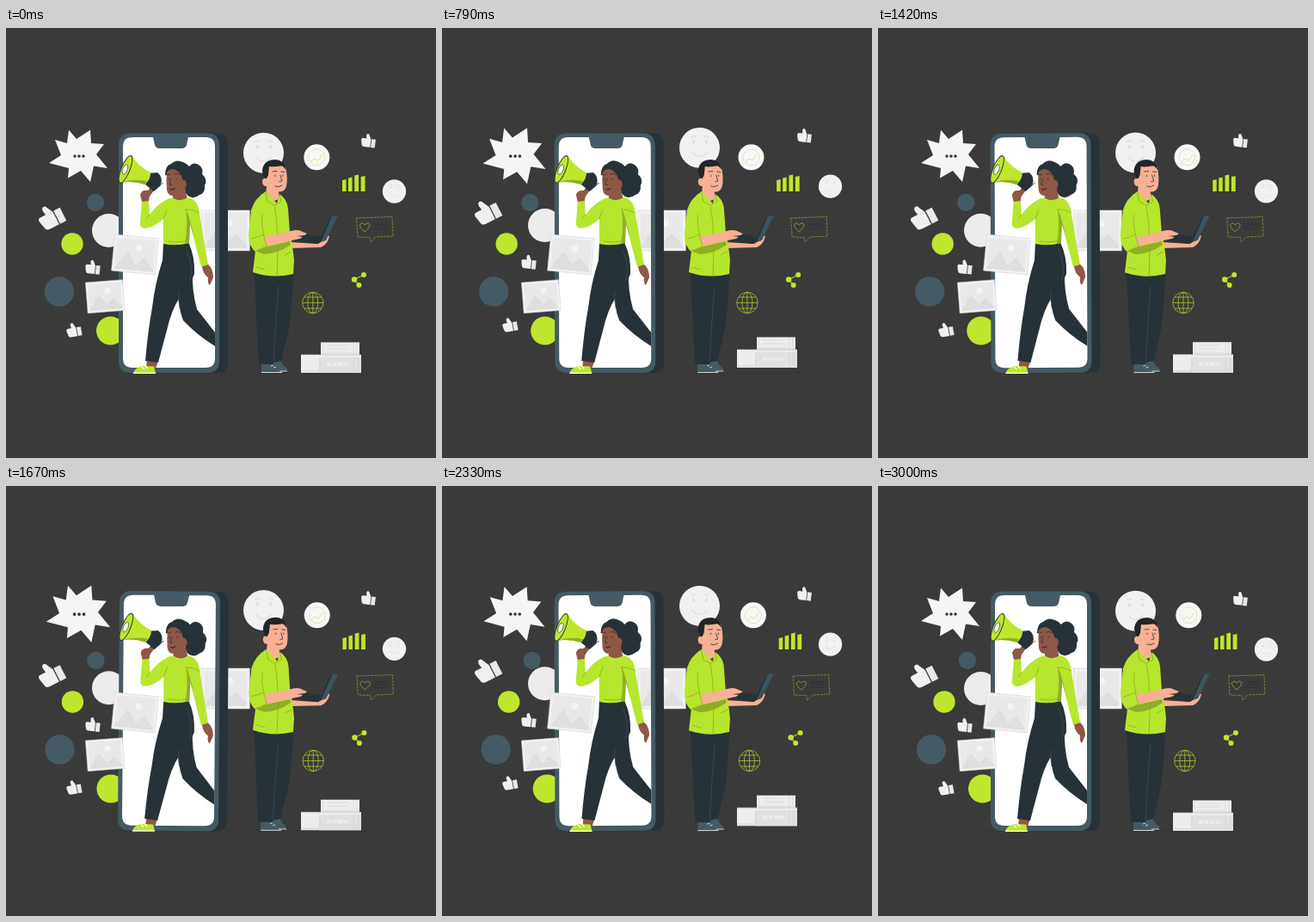
An HTML page for the animation above (3.04 s loop, 500 by 500 pixels).

```html
<!DOCTYPE html>
<html lang="en">
<head>
<meta charset="utf-8">
<title>Social campaign</title>
<style>
html, body { margin: 0; width: 100%; height: 100%; overflow: hidden; background: #3a3a3a }
svg { display: block; width: 100vw; height: 100vh }
.wind, .beat { transform-box: fill-box; transform-origin: center }
.green { fill: #bfe62c } .cloth { fill: #b7e62e } .shade { fill: #8fae26 }
.slate { fill: #455a64 } .dark { fill: #263238 }
.pale { fill: #f5f5f5 } .grey { fill: #e0e0e0 }
.brown { fill: #8f5746 } .skin { fill: #f9b094 }
.line { fill: none; stroke: #bfe62c; stroke-width: .8; stroke-opacity: .8 }
.thin { fill: none; stroke: #263238; stroke-width: .8; stroke-linecap: round }
.fold { fill: none; stroke: #86a51c; stroke-width: .7 }
.seam { fill: none; stroke: #435159; stroke-width: .7 }
.faint { fill: none; stroke: #dedede; stroke-linecap: round }
</style>
</head>
<body>
<svg viewBox="0 0 500 500">
<defs>
  <g id="thumb">
    <path fill="#f0f0f0" d="M5-3 0-13Q-5-15-5-9L-4-4H-12Q-15-3-14 1L-12 10Q-11 13-7 13H5Z"/>
    <path fill="#e8e8e8" d="M6.300-4H14.500V13H6.300Z"/>
  </g>
  <g id="photo">
    <path fill="#f2f2f2" stroke="#d2d2d2" stroke-width=".6" d="M-26-21.500H26V21.500H-26Z"/>
    <path fill="#e9e9e9" d="M-23-18.500H23V18.500H-23Z"/>
    <path fill="#dedede" d="M-23 18.500-9-3 2 12 11 3 23 16V18.500Z"/>
    <circle class="pale" cx="4" cy="-8" r="4"/>
  </g>
  <g id="face">
    <circle r="23.500" fill="#f1f1f1"/>
    <path class="faint" stroke-width="1.200" d="M-9 5Q0 15 9 5M-10-12Q-7-15-4-13M5-13Q8-15 11-12"/>
    <ellipse class="grey" cx="-7" cy="-7" rx="1.600" ry="2.400"/>
    <ellipse class="grey" cx="8" cy="-7" rx="1.600" ry="2.400"/>
  </g>
</defs>

<path d="M93 401H440" stroke="#323232" stroke-width=".6"/>

<g class="float">
  <use href="#thumb" transform="translate(51.500 219) rotate(-27)"/>
  <use href="#thumb" transform="translate(100.800 278) rotate(6) scale(.6)"/>
  <use href="#thumb" transform="translate(78.700 351) rotate(-10) scale(.6)"/>
  <use href="#thumb" transform="translate(421.300 131) rotate(7) scale(.58)"/>
  <circle cx="119.500" cy="235.500" r="19.500" fill="#ececec"/>
  <use href="#face" transform="translate(299.500 145.200)"/>
  <use href="#face" transform="translate(451.500 190) scale(.58)"/>
  <path fill="#ededed" d="M366 365.500H411V381H366ZM343 380H413V401H343Z"/>
  <path class="grey" d="M366 377.500H411V381H366ZM364 383H413V401H364ZM343 398H367V400.500H343Z"/>
  <path fill="none" stroke="#cdcdcd" stroke-width=".6" d="M368 365.500V377M404 366V377M408 366V377M365 384V400M404 383V400M409 383V400M343 380H413M373 369H397M373 373H397"/>
  <path fill="none" stroke="#ececec" stroke-width="4" stroke-dasharray="5 1.500" d="M373 391H398"/>
</g>

<g class="shake">
  <circle class="slate" cx="104" cy="203" r="10.200"/>
  <circle class="green" cx="77" cy="251" r="12.700"/>
  <circle class="slate" cx="62" cy="306.500" r="17.200"/>
  <circle class="green" cx="121.500" cy="352" r="16.500"/>
  <circle cx="361.300" cy="150.300" r="15" fill="#f8f8f8"/>
  <circle cx="361.300" cy="150.300" r="9.500" fill="none" stroke="#dde4c4" stroke-width="1"/>
  <path class="line" stroke-opacity=".6" d="M355 156 358 152 363 154 368 147"/>
  <path class="green" d="M391 177 395.500 176V190H391ZM398 174.500 402.500 173.500V190H398ZM405.300 171.500 410 170.500V190H405.300ZM412.700 173 417.500 172V190H412.700Z"/>
  <g stroke-opacity=".6">
    <path class="line" stroke-dasharray="3 1" style="stroke-opacity:.55" d="M407.500 221 449 219.500 450 242 430 243 424 249 423 243.500 409 243Z"/>
    <path class="line" style="stroke-opacity:.65" d="M417 237Q411 232 411.500 229Q414 225 417 229Q421 225 423 229Q423 232 417 237Z"/>
  </g>
  <path fill="none" stroke="#2f2f2f" stroke-width="1" d="M427 228H445M428 231H446M427 234H444"/>
  <path class="line" style="stroke-width:1.300" d="M416 287 405 292.500 410.500 299"/>
  <g class="green"><circle cx="405" cy="292.500" r="3.200"/><circle cx="416" cy="287" r="3"/><circle cx="410.500" cy="299" r="3"/></g>
  <g class="line"><circle cx="356.800" cy="319.500" r="12.200"/><ellipse cx="356.800" cy="319.500" rx="6" ry="12.200"/><path d="M356.800 307.500V331.500M344.800 319.500H369M347 313H367M347 326H367"/></g>
</g>

<g class="beat">
  <path class="pale" d="M73 118.500 82 129 98 118.500 99 134 114 135 105 147 118 163 102 160.500 98 179 87 166 72 174.500 73 163 50 157 64 148 57 130 71 134Z"/>
  <g class="dark"><circle cx="80" cy="149" r="1.700"/><circle cx="85" cy="149" r="1.700"/><circle cx="90" cy="149" r="1.700"/></g>
</g>

<rect class="wind" x="134" y="125" width="111" height="272" rx="11" fill="#fff"/>
<use href="#photo" transform="translate(255.500 235.500) scale(1.070 1.090)"/>
<g class="wind" fill-rule="evenodd">
  <path class="dark" d="M236 122.500H246Q258 122.500 258 136V388Q258 401 246 401H236Q246 397 246 386V138Q246 126 236 122.500Z"/>
  <path class="slate" d="M145 122.500H234Q248 122.500 248 136.500V387Q248 401 234 401H145Q131 401 131 387V136.500Q131 122.500 145 122.500ZM147 127Q136 127 136 138V384Q136 395 147 395H232Q243 395 243 384V138Q243 127 232 127H212L210 136Q209 140 204 140H179Q174 140 173 136L171 127Z"/>
</g>

<g class="wind">
  <path class="dark" d="M217 282Q216 306 222 327L243 354V370Q222 357 206 340Q200 325 200 302Z"/>
  <path class="brown" d="M164 386 177 387 174 396 163 395Z"/>
  <path class="dark" d="M183 250Q198 254 212 249Q220 266 219 286Q214 299 207 306Q196 320 190 340L177 389 162 387Q165 352 170 325Q173 298 182 270Z"/>
  <path class="seam" d="M210 258Q218 276 214 294M201 306Q200 316 202 326"/>
  <path class="green" d="M149 399Q151 395 159 393L172 393.500 174 401H148Z"/>
  <path fill="none" stroke="#fff" stroke-width="1.300" d="M148 401.300H174M158 394 161 397M162 393 165 396"/>

  <path class="dark" d="M185 171Q185 160 192 158Q198 152 206 156Q211 158 213 161Q218 155 224 159Q230 163 228 170Q235 176 231 183Q232 192 225 194Q219 199 213 196Q208 193 208 187L190 172Z"/>
  <path class="brown" d="M187 168Q186 177 187 188Q188 195 194 195L194 201Q203 205 211 199L208 187Q212 181 208 177Q205 178 204 172Q201 166 195 164Q189 164 187 168Z"/>
  <path class="thin" d="M188 171 191 170M196 170Q199 168 202 170.500M189 175V176.500M198 175V176.500M192 175 190 182 192.500 182.500"/>
  <path fill="none" stroke="#572c28" stroke-width="1.500" stroke-linecap="round" d="M191 187.500Q194 188.500 196 186.500"/>

  <path class="cloth" d="M166 200 167 217Q176 205 186 200Q190 197 195 198Q203 203 211 197Q221 198 224 210L229 240 235 275 227 278 219 247 214 226 213 250Q198 254 183 251L183 222Q172 232 162 233Q155 233 156 226L158 201Z"/>
  <path class="shade" d="M209 210Q213 217 219 245L214 228 213 250 208 250.500Q212 232 209 210Z"/>
  <path class="fold" d="M183 222 187 211M188 248Q198 250 208 248M167 217 163 222M208 211Q216 210 225 215"/>
  <path class="brown" d="M228 277.500 235 275Q241 280 241 290L237 299Q234 297 235 290Q229 286 228 277.500Z"/>

  <path class="dark" d="M166 169 176 168Q183 173 180 183L172 190 162 182Z"/>
  <path class="dark" d="M169 184 173 187 166 197 162 194Z"/>
  <path fill="none" stroke="#6b7b82" stroke-width="1" d="M179 183 183 180"/>
  <path class="green" d="M146 148Q154 161 168 168Q169 174 162 182Q147 177 133 180Z"/>
  <path class="shade" d="M134 180Q148 174.500 164 178L162 182Q147 177 133 180Z"/>
  <g transform="translate(139 164.300) rotate(22)">
    <ellipse class="dark" rx="5.500" ry="17.500"/>
    <ellipse class="green" rx="4.500" ry="16.300"/>
    <ellipse cx="-.5" cy=".5" rx="2.700" ry="6" fill="#f5f5f5" stroke="#263238" stroke-width=".6"/>
  </g>
  <path class="brown" d="M158 202 156 194Q158 188 164 189L169 187.500 171 190 167 195 166 201Z"/>
</g>

<use href="#photo" transform="translate(150 263.500) rotate(5.500) scale(.98)"/>
<use href="#photo" transform="translate(115.300 312.200) rotate(-4.500) scale(.83)"/>

<g class="wind">
  <path class="slate" d="M311 388 319 386Q322 393 327 396V399H312Z"/>
  <path class="dark" d="M289 285H334Q333 320 329 350L320 387 311 389 310 392 294 391Q291 340 289 285Z"/>
  <path class="seam" d="M317 300Q313 345 311 388"/>
  <path class="slate" d="M297 391 310 391Q314 396 321 398V401H297Z"/>
  <path fill="none" stroke="#e4e4e4" stroke-width=".9" d="M297 400.500H321M318 399H327M308 393 311 392M311 395 314 394"/>

  <path class="skin" d="M302 166Q303 159 309 159L325 161Q328 175 326 184Q324 191 317 190.500L318 198Q311 205 302 196L303 184Q298 184 298 178Q299 173 303 175Z"/>
  <path fill="#20262a" d="M301 175Q296 167 299.500 160Q303 153 313 153Q323 153 326 165L321 160Q312 162 306 161L305 171 303 175Z"/>
  <path class="thin" d="M310 167 315 166.500M320 167 324 167.500M313 171V172.500M322 171V172.500M319 171 321 178 318 178.500M313 184Q317 186 321 183"/>
  <path class="skin" d="M330 249 361 251Q367 246 372 240L376 242Q374 252 366 255L331 256Z"/>
  <path class="cloth" d="M302 190Q289 198 285 212L282 240Q282 255 290 259L287 284Q310 292 334 286L335 270Q333 250 330 238L328 210Q327 199 318 193L315 204Z"/>
  <path class="shade" d="M289 259 304 254 330 248 331 252Q315 263 300 263Z"/>
  <path class="fold" d="M302 191 304 202 312 206 320 202 318 194M312 206Q318 235 315 288M300 241Q296 228 298 217M291 278 301 281M324 264 332 260"/>
  <path class="dark" d="M334 247 350 240 372 244 363 251Z"/>
  <path fill="#3c5360" d="M363 250 376 221Q377 219.500 379 219L386 218 372 247Z"/>
  <path class="dark" d="M363 250 376 221Q377 219.500 379 219L366 249Z"/>
  <path class="skin" d="M299 243 328 237Q339 233 345 237L350 239 347 241 338 242 345 243 342 245 327 248 302 254Z"/>
  <path class="cloth" d="M284 239 299 239 303 254 290 260Q283 256 284 239Z"/>
  <path class="fold" d="M285 245Q292 244 299 240L303 254 290 259"/>
</g>
</svg>
<script>
const LOOP = 3040, FRAMES = 73, FPS = 24;
const sway = [[0, 0], [.25, 1], [.75, -1], [1, 0]];
const pulse = [[0, 1], [.1, 1.1], [.3, 1], [.4, 1], [.5, 1.1], [.6, 1], [1, 1]];
const jolt = [0, -1, 2, -4, 4, -4, 4, -4, 2, -1, 0].map((x, i) => [i / 10, x]);

// Linear interpolation between keyframes
function at(keys, p) {
  const i = Math.max(1, keys.findIndex(k => k[0] >= p));
  const [a, x] = keys[i - 1], [b, y] = keys[i];
  return x + (y - x) * (p - a) / (b - a);
}

const move = (name, value) =>
  document.querySelectorAll('.' + name).forEach(el => el.style.transform = value);

function draw(now) {
  const frame = Math.floor((now % LOOP + 6) * FPS / 1000) % FRAMES;
  const s = frame / FPS, half = s / 1.5 % 1;
  const lift = 3 * (1 - Math.cos(2 * Math.PI * half));
  move('float', `translateY(${-lift}px)`);
  move('shake', `translateX(${at(jolt, s / 3)}px)`);
  move('beat', `scale(${at(pulse, half)})`);
  move('wind', `rotate(${at(sway, half)}deg)`);
}

const start = performance.now();
(function tick() {
  draw(performance.now() - start);
  requestAnimationFrame(tick);
})();
</script>
</body>
</html>
```
